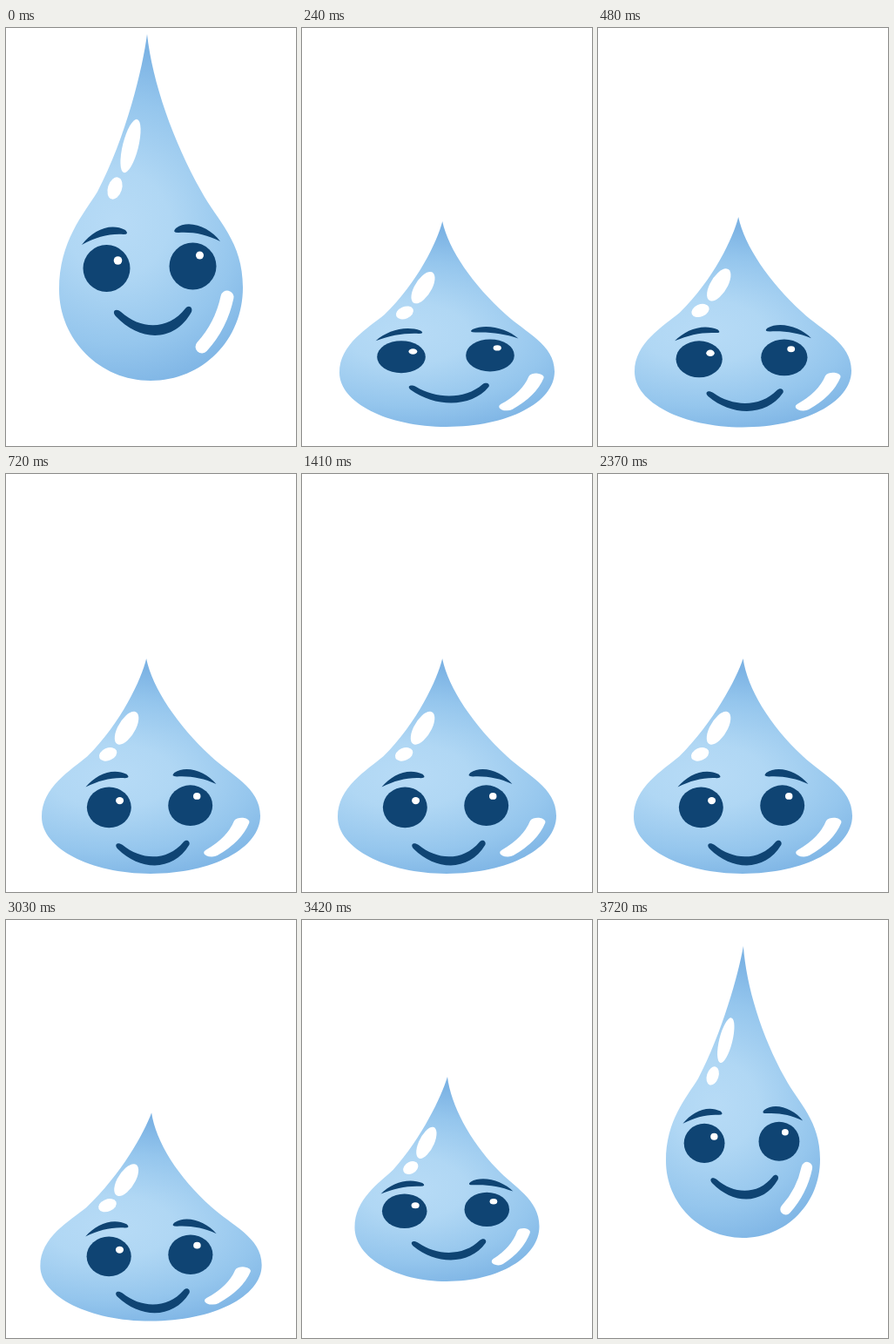
Animation of 333 by 480 pixels, one loop 3.75 s. Source, as an HTML page:

```html
<!DOCTYPE html>
<html lang="en">
<head>
<meta charset="utf-8">
<title>Water drop</title>
<style>
  html, body { margin: 0; width: 100%; height: 100%; overflow: hidden; background: #fff; }
  svg { display: block; width: 100%; height: 100%; }
  .shine { fill: #fff; }
  .ink { fill: #0f4473; }
</style>
</head>
<body>
<svg viewBox="0 0 333 480">
  <defs>
    <radialGradient id="water" gradientUnits="userSpaceOnUse" cx="128" cy="224" r="200">
      <stop offset="0" stop-color="#b7dbf6"/>
      <stop offset=".3" stop-color="#b0d7f4"/>
      <stop offset=".7" stop-color="#95c6ed"/>
      <stop offset="1" stop-color="#7cb3e4"/>
    </radialGradient>
  </defs>
  <g id="body">
    <path id="skin" fill="url(#water)"/>
    <ellipse class="shine" rx="9" ry="31.5" transform="translate(143 135.5) rotate(14)"/>
    <ellipse class="shine" rx="8" ry="13" transform="translate(125 184) rotate(18)"/>
    <path d="M254 309Q247 342 225 366" fill="none" stroke="#fff" stroke-width="15" stroke-linecap="round"/>
  </g>
  <g id="face">
    <path class="ink" d="M87 249C100 232 120 223 137 232Q142 237 135 237C118 236 104 240 87 249Z"/>
    <path class="ink" d="M246 245C234 229 210 219 195 230Q190 235 198 235C215 234 230 237 246 245Z"/>
    <circle class="ink" cx="115.500" cy="276" r="27"/>
    <circle class="ink" cx="214.500" cy="273.500" r="27"/>
    <circle class="shine" cx="128.500" cy="267" r="4.800"/>
    <circle class="shine" cx="222.500" cy="261" r="4.500"/>
    <path class="ink" d="M126 331C121 325 126 321 132 326C155 347 187 347 206 322C210 317 215 321 213 326C194 361 154 361 126 331Z"/>
  </g>
</svg>
<script>
const LOOP = 3750, STEP = 30;

const mix = (a, b, u) => a + (b - a) * u;
const smooth = u => u * u * (3 - 2 * u);
const easeIn = p => u => u ** p;
const easeOut = p => u => 1 - (1 - u) ** p;
const span = (t, from, to) => Math.min(1, Math.max(0, (t - from) / (to - from)));

// Half width, tip y, bottom y; face y, scale x, scale y
const tall = [105.5, 7, 405, 275, 1, 1];
const landed = [123.5, 222, 458, 377, 1.03, 0.687];
const rest = [125.5, 212, 459, 382, 0.943, 0.865];
const crouch = [134, 260, 467, 400, 0.96, 0.76];
const rise = [106, 180, 415, 333.5, 0.955, 0.73];
const high = [88.5, 30, 365, 255.5, 0.867, 0.835];

const moves = [
  { from: 0, to: 240, a: tall, b: landed, ease: easeOut(2) },
  { from: 240, to: 720, a: landed, b: rest, ease: smooth },
  { from: 3000, to: 3210, a: rest, b: crouch, ease: easeOut(1.4) },
  { from: 3210, to: 3420, a: crouch, b: rise, ease: easeIn(2) },
  { from: 3420, to: 3720, a: rise, b: high, ease: easeOut(3) }
];

function poseAt(t) {
  const { from, to, a, b, ease } = moves.findLast(m => m.from <= t);
  const u = ease(span(t, from, to));
  return a.map((v, i) => mix(v, b[i], u));
}

// Tip leans left, then right, while the drop rests
function tipX(t) {
  const left = mix(162, 156, smooth(span(t, 1410, 1900)));
  return mix(left, 167, smooth(span(t, 1900, 2430)));
}

const [body, skin, face] = ["body", "skin", "face"].map(id => document.getElementById(id));

function dropPath(x) {
  const lean = (x - 162) * 0.6;
  return `M${x} 7C${157 + lean} 46 138 125 105 188C89 214 61 245 61 300` +
    `C61 358 108 405 166 405C226 405 272 358 272 298` +
    `C272 245 243 222 224 187C192 130 ${168 + lean} 62 ${x} 7Z`;
}

function draw(t) {
  const [w, tip, bottom, y, sx, sy] = poseAt(t);
  const wobble = Math.sin(2 * Math.PI * span(t, 240, 720));
  const top = tip + 20 * wobble, half = w + 4 * wobble;
  skin.setAttribute("d", dropPath(tipX(t)));
  body.setAttribute("transform",
    `translate(166.5 ${top}) scale(${half / 105.5} ${(bottom - top) / 398}) translate(-166.5 -7)`);
  face.setAttribute("transform",
    `translate(165.2 ${y + 6 * wobble}) scale(${sx} ${sy}) translate(-165.2 -275)`);
}

const start = performance.now();
function tick() {
  const t = (performance.now() - start) % LOOP;
  draw(Math.floor(t / STEP) * STEP);
  requestAnimationFrame(tick);
}
tick();
</script>
</body>
</html>
```
